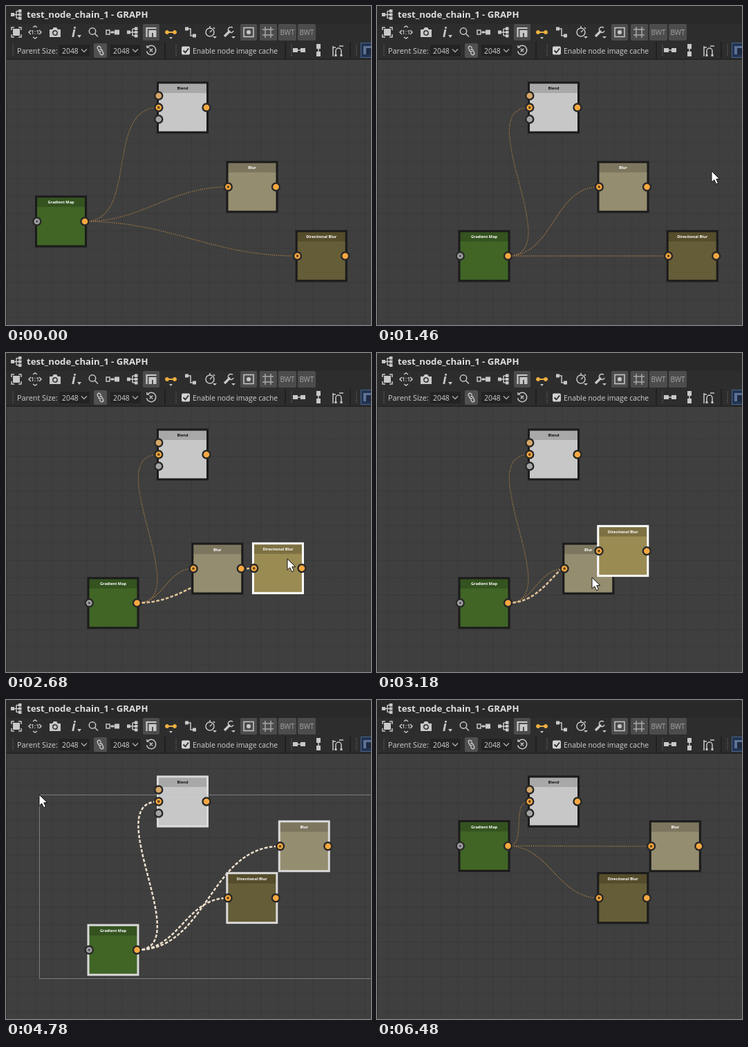
Animation, 528 px wide and 462 px high, one loop 6.54 s. Source, as an HTML page:

```html
<!DOCTYPE html>
<html lang="en">
<head>
<meta charset="utf-8">
<title>Node graph</title>
<style>
  html, body { margin: 0; width: 100%; height: 100%; overflow: hidden; background: #3f3f3f; }
  svg { display: block; width: 528px; height: 462px; }
  text { font-family: "Open Sans", "Noto Sans", sans-serif; }
  .icon { fill: none; stroke: #c8c8c8; stroke-width: 1.5; }
  .icon .solid { fill: #c8c8c8; stroke: none; }
</style>
</head>
<body>
<svg viewBox="0 0 528 462">
  <defs>
    <pattern id="grid" x="17" y="99" width="25.1" height="25.1" patternUnits="userSpaceOnUse">
      <path d="M0.5 0V25.1M0 0.5H25.1" stroke="#393939"/>
    </pattern>
  </defs>
  <rect width="528" height="462" fill="#3f3f3f"/>
  <rect y="77" width="528" height="385" fill="url(#grid)"/>
  <g id="scene"></g>
  <g id="chrome"></g>
  <path id="pointer" d="M0 0V16.2L3.8 12.8 6.6 18.8 9.5 17.5 6.8 11.7H11.8Z" fill="#fff" stroke="#111"/>
</svg>
<script>
const LOOP = 6540;
const SNAP = 12.55;
const byId = id => document.getElementById(id);

const nodes = {
  gradient: { label: 'Gradient Map', x: 79.5, y: 312, head: '#34531f', body: '#406525', ink: '#fff' },
  blend: { label: 'Blend', x: 255.5, y: 147, head: '#a8a8a8', body: '#c7c7c7', ink: '#111' },
  blur: { label: 'Blur', x: 356, y: 262, head: '#7d765f', body: '#958d70', ink: '#fff',
          hotHead: '#9a9175', hotBody: '#b8ae8b' },
  directional: { label: 'Directional Blur', x: 456.2, y: 362, head: '#554c2b', body: '#655d37', ink: '#fff',
                 hotHead: '#7d7042', hotBody: '#9a8b53' }
};

// Pointer path: time, x, y
const path = [
  [0, 600, 475], [100, 545, 466], [540, 16, 91], [680, 26, 93], [780, 26, 93],
  [1320, 484, 236], [1460, 484, 239], [1640, 355, 268], [1920, 305, 318], [1980, 305, 318],
  [2180, 470, 348], [2640, 418, 300], [2680, 407, 298], [2900, 370, 273], [2960, 370, 273],
  [3180, 311, 325], [3300, 311, 325], [3740, 436, 225], [3790, 436, 225], [3970, 482, 371],
  [4000, 482, 371], [4110, 545, 403], [4620, 51, 132], [4690, 48, 126], [4780, 48, 137],
  [4840, 48, 137], [5260, 545, 250], [LOOP, 600, 250]
];

// "until" is the moment the resulting selection is dropped.
const drags = [
  { id: 'blur', start: 1640, end: 1940, until: 2180 },
  { id: 'directional', start: 2180, end: 2930, until: 3300 },
  { id: 'blur', start: 3300, end: 3760, until: 4110 }
];
const marquees = [
  { start: 100, end: 760, until: 1400 },
  { start: 4110, end: 4820, until: 5400 }
];

function pointerAt(t) {
  const i = path.findIndex(k => k[0] > t);
  const [t0, x0, y0] = path[i - 1], [t1, x1, y1] = path[i];
  const u = (t - t0) / (t1 - t0), e = u * u * (3 - 2 * u);
  return { x: x0 + (x1 - x0) * e, y: y0 + (y1 - y0) * e };
}

const snap = v => Math.round(v / SNAP) * SNAP;
const during = (list, t, stop) => list.find(a => t >= a.start && t < a[stop]);

function position(id, t) {
  if (id === 'gradient' && t >= 1000) return { x: 155, y: t < 5000 ? 362 : 211.4 };
  let { x, y } = nodes[id];
  for (const d of drags) {
    if (d.id !== id || t < d.start) continue;
    const from = pointerAt(d.start), to = pointerAt(Math.min(t, d.end));
    x += snap(to.x - from.x);
    y += snap(to.y - from.y);
  }
  return { x, y };
}

function marqueeBox(m, t) {
  const from = pointerAt(m.start), to = pointerAt(Math.min(t, m.end));
  return { left: Math.round(to.x), top: Math.round(to.y), right: Math.round(from.x), bottom: Math.round(from.y) };
}

function isSelected(id, p, t) {
  const drag = during(drags, t, 'until');
  if (drag) return drag.id === id;
  const m = during(marquees, t, 'until');
  if (!m) return false;
  const b = marqueeBox(m, t);
  return p.x + 37 > b.left && p.x - 37 < b.right && p.y + 37 > b.top && p.y - 37 < b.bottom;
}

function port(x, y, color, dot) {
  return `<circle cx="${x}" cy="${y}" r="5.5" fill="${color}" stroke="#282828" stroke-width="2.4"/>` +
    (dot ? `<circle cx="${x}" cy="${y}" r="1.9" fill="${dot}"/>` : '');
}

function drawNode(id, p, selected, hot) {
  const n = nodes[id], amber = '#f8a840', gray = '#a4a4a4';
  const border = hot ? '#fff' : selected ? '#dadada' : '#1b1b1b';
  const left = p.x - 34.7, linked = port(left, p.y, amber, '#6b4a1a');
  const inputs = id === 'gradient' ? port(left, p.y, gray, '#5c5866')
    : id === 'blend' ? port(left, p.y - 17, '#d6a767') + linked + port(left, p.y + 17, gray)
    : linked;
  return `<rect x="${p.x - 36}" y="${p.y - 36}" width="72" height="72" fill="${hot ? n.hotBody : n.body}"/>
    <rect x="${p.x - 36}" y="${p.y - 36}" width="72" height="15" fill="${hot ? n.hotHead : n.head}"/>
    <rect x="${p.x - 36}" y="${p.y - 36}" width="72" height="72" fill="none" stroke="${border}" stroke-width="3"/>
    <text x="${p.x}" y="${p.y - 25.6}" font-size="5.6" font-weight="700" text-anchor="middle" fill="${n.ink}">${n.label}</text>
    ${inputs}${port(p.x + 34.5, p.y, amber)}`;
}

function drawLink(a, b, ends) {
  const x0 = a.x + 34.5, x1 = b.x - 34.7;
  const reach = 0.4 * Math.hypot(x1 - x0, b.y - a.y);
  const style = ends
    ? `stroke="${ends > 1 ? '#eee0cd' : '#e2c59a'}" stroke-width="2.5" stroke-dasharray="4.6 2.4"`
    : 'stroke="#a67b43" stroke-width="1.3" stroke-dasharray="1.4 1.6"';
  return `<path d="M${x0} ${a.y}C${x0 + reach} ${a.y} ${x1 - reach} ${b.y} ${x1} ${b.y}" fill="none" ${style}/>`;
}

function render(t) {
  const ids = Object.keys(nodes), at = {}, sel = {};
  for (const id of ids) {
    at[id] = position(id, t);
    sel[id] = isSelected(id, at[id], t);
  }
  const drag = during(drags, t, 'until');
  const hotId = drag && t < (drag.id === 'directional' ? drag.until : drag.end + 60) ? drag.id : null;
  if (drag) ids.sort((a, b) => (a === drag.id) - (b === drag.id));

  let out = ['blend', 'blur', 'directional']
    .map(id => drawLink(at.gradient, at[id], sel.gradient + sel[id])).join('');
  out += ids.map(id => drawNode(id, at[id], sel[id], id === hotId)).join('');

  const m = during(marquees, t, 'end');
  if (m) {
    const b = marqueeBox(m, t);
    out += `<rect x="${b.left + 0.5}" y="${b.top + 0.5}" width="${Math.max(0, b.right - b.left)}" height="${Math.max(0, b.bottom - b.top)}"
      fill="none" stroke="#b4bcc8" stroke-dasharray="1 1" stroke-dashoffset="0.5"/>`;
  }
  byId('scene').innerHTML = out;
  const c = pointerAt(t);
  byId('pointer').setAttribute('transform', `translate(${c.x} ${c.y})`);
}

const box = (x, y, w, h, fill, extra = '') =>
  `<rect x="${x}" y="${y}" width="${w}" height="${h}" fill="${fill}" ${extra}/>`;
const label = (x, y, size, str, extra = 'fill="#d2d2d2"') =>
  `<text x="${x}" y="${y}" font-size="${size}" ${extra}>${str}</text>`;
const icon = (x, y, body) => `<g class="icon" transform="translate(${x} ${y})">${body}</g>`;
const line = d => `<path d="${d}"/>`;
const solid = d => `<path class="solid" d="${d}"/>`;
const handle = x => `<path d="M${x} 56V74" stroke="#5c5c5c" stroke-width="2" stroke-dasharray="1 2"/>`;
const dropdown = x => box(x, 56, 44, 17, '#232323', 'rx="2"') + label(x + 4, 68.5, 10.4, '2048') +
  `<path d="M${x + 32} 62.5l4 4 4-4" fill="none" stroke="#aaa" stroke-width="1.4"/>`;

function drawChrome() {
  const tree = line('M-3 0H0M0-5V5M0-5H3M0 5H3M0 0H3') + solid('M-8-2.5h5v5h-5zM3-7.5h4.5v4.5H3zM3-2h4.5v4H3zM3 3h4.5v4.5H3z');
  const blocks = line('M-2 0H2') + solid('M-9-3h7v6h-7zM2-3h7v6H2z');
  const pressed = [[198, 24], [339, 24], [367, 25], [394, 26], [422, 26]];
  byId('chrome').innerHTML =
    box(0, 0, 528, 77, '#2d2d2d') + box(0, 0, 528, 26, '#292929') + box(0, 76, 528, 2, '#252525') +
    box(0, 77, 1, 385, '#2b2b2b') +
    icon(15, 12.5, tree) + label(30, 17, 13.2, 'test_node_chain_1 - GRAPH', 'fill="#dedede" font-weight="700"') +
    pressed.map(([x, w]) => box(x, 26, w, 24, '#4c4c4c', 'rx="2"')).join('') +
    icon(15, 38, line('M-7-3V-7H-3M3-7H7V-3M7 3V7H3M-3 7H-7V3') + solid('M-5-5H5V5H-5z')) +
    icon(42, 38, line('M-6-3l-3 3 3 3M6-3l3 3-3 3M-3-7l3-2 3 2M-3 7l3 2 3-2')) +
    label(42, 41.3, 9, '1:1', 'fill="#c8c8c8" text-anchor="middle" font-weight="600"') +
    icon(71, 38, solid('M-8-4h4l2-3h4l2 3h4V7H-8z') + '<circle r="3.2" cy="1" stroke="#2d2d2d"/>') +
    label(95, 45, 19, 'i', 'fill="#c8c8c8" font-style="italic" font-weight="700"') +
    icon(101, 42, solid('M2 0h6l-3 4z')) +
    icon(126, 38, '<circle cx="-1" cy="-1.5" r="4.7"/>' + line('M2.5 2L7 6.5')) +
    icon(154, 38, line('M-3 0H3M-9-3H-4V3H-9z') + solid('M-2-1.5H2V1.5H-2zM3-3.5h7v7H3z')) +
    icon(183, 38, tree) +
    icon(210, 38, '<path d="M-6.5 7V-6H7.5" stroke-width="2.2"/>' + solid('M-3.5 7V-3H7.5V7H3V1H1V7z')) +
    `<g stroke="#eeb041" fill="#eeb041"><path d="M234 38H243" stroke-width="2"/><circle cx="233" cy="38" r="2.5"/><circle cx="244" cy="38" r="2.5"/></g>` +
    icon(238, 43, solid('M-2 2h5l-2.5 3z')) +
    icon(267, 38, line('M-5-5H0V5H5') + solid('M-8-7.5h5v5h-5zM3 2.5h5v5H3z')) +
    icon(295, 38, '<circle r="6"/>' + line('M0-9V-6M0 0L3-3M5-7l2 2') + solid('M4 6h6l-3 3z')) +
    icon(322, 38, '<path d="M-6 6L2-2" stroke-width="3.4"/>' + line('M6-6.5A4 4 0 1 0 7-2') + solid('M4 6h6l-3 3z')) +
    icon(351, 38, line('M-7-6.5H7V6.5H-7z') + '<circle class="solid" r="3"/>') +
    `<g opacity=".75">${icon(379, 38, line('M-4-8V8M4-8V8M-8-4H8M-8 4H8'))}</g>` +
    [407, 435].map(x => label(x, 41.5, 10, 'BWT', 'fill="#a5a5a5" text-anchor="middle"')).join('') +
    handle(10) + label(16, 68.5, 10.8, 'Parent Size:') + dropdown(77) +
    box(127, 54, 19, 21, '#505050', 'rx="2"') +
    icon(136.5, 64.5, line('M1-3l-1-2a2 2 0 0 0-4 2l2 4a2 2 0 0 0 3 0M-1 3l1 2a2 2 0 0 0 4-2l-2-4a2 2 0 0 0-3 0')) +
    dropdown(151) +
    icon(210, 64, line('M-4.5-5A6.7 6.7 0 1 1-6.5 1.5M-6-7V-4H-3M-2.2-2.2l4.4 4.4M2.2-2.2l-4.4 4.4')) +
    box(229, 52, 2, 24, '#202020') + handle(246) +
    box(254, 58.5, 12, 12, '#d2d2d2', 'rx="2"') +
    '<path d="M256.5 64.5l3 3 4.5-6" fill="none" stroke="#292929" stroke-width="1.8"/>' +
    label(270, 68.5, 10.4, 'Enable node image cache') +
    box(403, 52, 2, 24, '#202020') + handle(413) +
    icon(424, 64, blocks) + icon(452, 64, `<g transform="rotate(90)">${blocks}</g>`) +
    icon(481, 65, line('M-4 8V0a4 4 0 0 1 8 0V8M-8-7V8M-8-5H-4M1-7H7') + solid('M-5.5 5h3v3h-3zM2.5 5h3v3h-3z')) +
    box(497, 52, 2, 24, '#202020') + handle(507) +
    box(513.5, 53.5, 16, 21, '#22344f', 'stroke="#46648f"') +
    box(517, 58, 11, 12, '#5c7296') + box(521, 61, 7, 9, '#1d2a40');
}

drawChrome();
const began = performance.now();
function tick() {
  render((performance.now() - began) % LOOP);
  requestAnimationFrame(tick);
}
tick();
</script>
</body>
</html>
```
